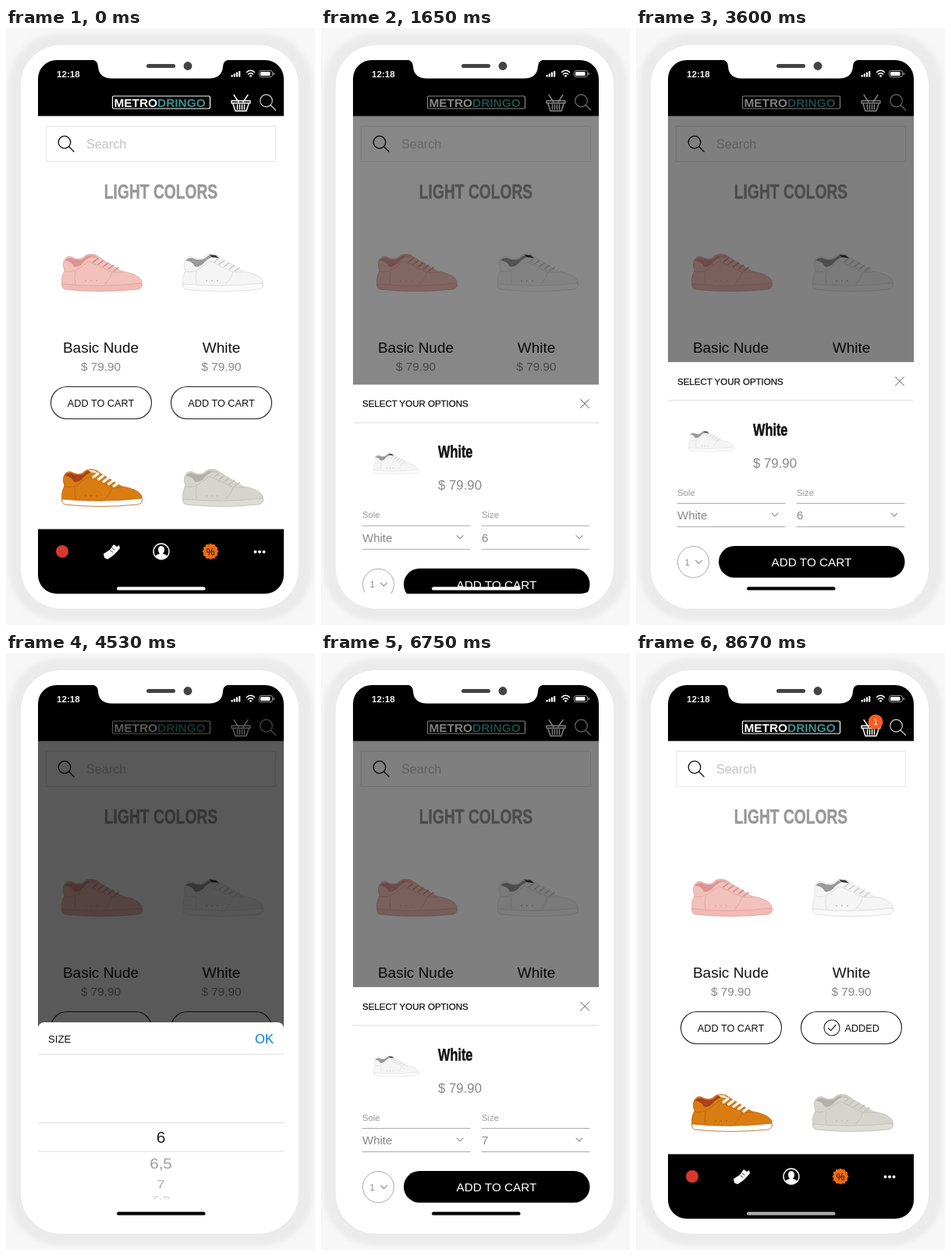
Recreate the animation shown at these times as an HTML page. Size 396 px wide and 763 px high, loop 8700 ms.

```html
<!DOCTYPE html>
<html lang="en">
<head>
<meta charset="utf-8">
<title>Shop demo</title>
<style>
html, body { margin: 0; width: 100%; height: 100%; overflow: hidden; background: #f7f7f7; }
svg { display: block; width: 100%; height: 100%; }
text { font-family: "Liberation Sans", Arial, sans-serif; }
.mid { text-anchor: middle; }
.bold { font-weight: bold; }
.line { fill: none; stroke-linecap: round; stroke-linejoin: round; }
</style>
</head>
<body>
<svg id="stage" viewBox="0 0 396 763"></svg>
<script>
const LOOP = 8700;
const CONDENSED = 0.76;
const SHEET_TOP = 427, PICKER_TOP = 481, SCREEN_BOTTOM = 723;
const WHEEL_R = 80, WHEEL_STEP = 0.425;
const SIZES = ['6', '6,5', '7', '7,5', '8', '8,5', '9', '9,5'];

const text = (x, y, size, fill, str, attrs = '') =>
  `<text x="${x}" y="${y}" font-size="${size}" fill="${fill}" ${attrs}>${str}</text>`;
const mid = (x, y, size, fill, str, attrs = '') => text(x, y, size, fill, str, `class="mid" ${attrs}`);
const line = (d, stroke, width = 1, attrs = '') =>
  `<path class="line" d="${d}" stroke="${stroke}" stroke-width="${width}" ${attrs}/>`;
const rect = (x, y, w, h, fill, attrs = '') =>
  `<rect x="${x}" y="${y}" width="${w}" height="${h}" fill="${fill}" ${attrs}/>`;
const circle = (x, y, r, fill, attrs = '') => `<circle cx="${x}" cy="${y}" r="${r}" fill="${fill}" ${attrs}/>`;
const condensed = (x, y, size, fill, str, cls) =>
  `<g transform="translate(${x} ${y}) scale(${CONDENSED} 1)">
    ${text(0, 0, size, fill, str, `class="bold ${cls}" stroke="${fill}" stroke-width=".5"`)}</g>`;
const lens = (x, y, r, stroke, width) => {
  const a = r * 0.71;
  return circle(x, y, r, 'none', `stroke="${stroke}" stroke-width="${width}"`) +
    line(`M${x + a} ${y + a}l6.5 6.5`, stroke, width);
};
const roundRect = (x, y, w, h, r) =>
  `M${x + r} ${y}h${w - 2 * r}a${r} ${r} 0 0 1 ${r} ${r}v${h - 2 * r}a${r} ${r} 0 0 1 ${-r} ${r}` +
  `h${2 * r - w}a${r} ${r} 0 0 1 ${-r} ${-r}v${2 * r - h}a${r} ${r} 0 0 1 ${r} ${-r}Z`;

const SHOES = {
  nude: { upper: '#f3c1bc', sole: '#f2bab4', edge: '#dba39e', inner: '#d99591', lace: '#c99490', tag: '#e0a7a2' },
  white: { upper: '#f5f5f5', sole: '#fafafa', edge: '#d8d8d8', inner: '#9a9a9a', lace: '#cfcfcf', tag: '#3a3a3a' },
  orange: { upper: '#d97d12', sole: '#ffffff', edge: '#b8600f', inner: '#a8401c', lace: '#ffffff', tag: '#f4e6d4' },
  grey: { upper: '#d6d4ce', sole: '#dedcd6', edge: '#bdbbb4', inner: '#b2b0a9', lace: '#c2c0b6', tag: '#c8c6bf' }
};

function shoe(x, y, tone, scale = 1) {
  const c = SHOES[tone];
  const laces = [0, 1, 2, 3, 4].map(i => `M${41 + i * 6.5} ${10 + i * 2.9}l6 -4.5`).join('');
  return `<g transform="translate(${x} ${y}) scale(${scale})">
    <path d="M3 9Q6 2 12 3Q20 8 27 5Q31 0 37 0L44 1Q54 8 63 13Q70 18 78 22Q98 25 103 34V41H1Q-1 30 4 21Q1 14 3 9Z" fill="${c.upper}" stroke="${c.edge}" stroke-width=".7"/>
    <path d="M4 8Q8 4 13 5Q21 9 28 6L33 2L40 3Q31 6 27 12Q22 17 16 16Q13 9 4 8Z" fill="${c.inner}"/>
    <path d="M34 .5L43 1.500L47 5L38 4Z" fill="${c.tag}"/>
    <path d="M1 38Q50 43 103 37Q105 43 98 45Q50 50 4 45Q0 43 1 38Z" fill="${c.sole}" stroke="${c.edge}" stroke-width=".8"/>
    ${line('M4 22Q14 25 24 17L35 9L65 23Q63 31 56 38M65 23L79 23M18 22Q16 30 18 38', c.edge, 0.8)}
    ${line(laces, c.lace, tone === 'orange' ? 3.2 : 1.7)}
    ${[31, 38, 45].map(d => circle(d, 34, 0.8, c.inner)).join('')}
  </g>`;
}

const button = (x, label) =>
  rect(x, 458.5, 129, 41, '#fff', 'rx="20.5" stroke="#222" stroke-width="1.1"') + label;

const basket = () =>
  line('M292 85.500l6 9M310 85.500l-6 9M289 93H313V96H289Z', '#fff', 1.4) +
  line('M291 97L294 106H308L311 97M296.5 98v6M299.5 98v6M302.5 98v6M305.5 98v6', '#fff', 1.5);

function scallop(x, y) {
  const points = Array.from({ length: 24 }, (_, i) => {
    const r = i % 2 ? 9 : 10.6, a = i * Math.PI / 12;
    return `${(x + r * Math.cos(a)).toFixed(1)},${(y + r * Math.sin(a)).toFixed(1)}`;
  });
  return `<polygon points="${points.join(' ')}" fill="#ed6b11"/>`;
}

const header = () => rect(41, 41, 315, 71.5, '#000') +
  rect(136.5, 87, 125, 16, '#000', 'rx="1.5" stroke="#fff" stroke-width="1.2"') +
  text(138.5, 100.5, 15.4, '#fff', 'METRO<tspan fill="#3d8f8c">DRINGO</tspan>', 'class="bold"') +
  basket() +
  `<g id="badge">${circle(0, 0, 9.5, '#f95c20')}${mid(0, 4, 11, '#fff', '1')}</g>` +
  lens(333.5, 93, 7.8, '#ccc', 1.2);

const nav = () => rect(41, 640.5, 315, 83, '#000') +
  circle(72, 669, 8, '#d8382f') +
  `<path d="M125 672L133 667L138 660L142 663L145 661L146 665L138 674L130 679L126 677Z" fill="#fff"/>` +
  line('M126 679L131 680L146 667M134 668l3 2M136 665l3 2', '#000', 0.8) +
  circle(199, 669, 10, '#000', 'stroke="#fff" stroke-width="1.4"') +
  `<path d="M191.5 675Q193 672.5 197 672Q194.5 669 195 665.5Q196 662 199 662Q202 662 203 665.5Q203.5 669 201 672Q205 672.5 206.5 675Q203.5 678.3 199 678.3Q194.5 678.3 191.5 675Z" fill="#fff"/>` +
  scallop(262, 669) + mid(262, 673.5, 12, '#111', '%') +
  [319.5, 325, 330.5].map(x => circle(x, 669.5, 1.9, '#fff')).join('');

const product = (cx, name) => mid(cx, 414.7, 19, '#111', name) + mid(cx, 438, 15.3, '#888', '$ 79.90');
const addLabel = x => mid(x, 483.5, 12.7, '#111', 'ADD TO CART');

const page = () => rect(41, 41, 315, 683, '#fff') +
  rect(51.5, 125.5, 294, 45, '#fff', 'stroke="#e6e6e6"') +
  lens(75, 146, 7.8, '#111', 1.3) + text(103, 154, 16.2, '#c3c3c3', 'Search') +
  condensed(198.5, 217.5, 25.3, '#999', 'LIGHT COLORS', 'mid') +
  shoe(71, 289, 'nude') + shoe(226, 289, 'white') +
  product(121.5, 'Basic Nude') + product(276, 'White') +
  button(57.5, addLabel(121.5)) +
  button(211.5, `<g id="toAdd">${addLabel(276)}</g><g id="added">` +
    circle(251, 479, 10, 'none', 'stroke="#222" stroke-width="1.1"') +
    line('M246.5 479.5L249.7 482.7L256 475.5', '#222', 1.2) +
    text(267.5, 483.5, 12.7, '#111', 'ADDED') + '</g>') +
  shoe(71, 564, 'orange') + shoe(226, 564, 'grey') +
  header() + nav();

const chevron = (x, y) => line(`M${x - 4} ${y - 2}l4 4l4-4`, '#999', 1.1);
const field = (x, w, label, value, id) => text(x, 597.5, 11.3, '#999', label) +
  line(`M${x} 607.5h${w}M${x} 637.5h${w}`, '#aaa', 1) +
  text(x, 628, 15, '#888', value, `id="${id}"`) + chevron(x + w - 13, 622);

const sheet = () => rect(41, SHEET_TOP, 315, 330, '#fff') +
  text(53, 455.5, 11.5, '#111', 'SELECT YOUR OPTIONS', 'stroke="#111" stroke-width=".25"') +
  line('M332.5 446l11 11m0-11l-11 11', '#555', 1) +
  rect(41, 475.5, 315, 1, '#ddd') +
  shoe(67, 515, 'white', 0.56) +
  condensed(150, 520.5, 21.5, '#111', 'White', '') +
  text(150, 561.5, 16.8, '#888', '$ 79.90') +
  field(53, 138, 'Sole', 'White', 'soleValue') + field(206, 138, 'Size', '6', 'sizeValue') +
  circle(73.5, 682.5, 20, '#fff', 'stroke="#aaa"') + text(62.5, 686.5, 11.5, '#888', '1') + chevron(80.5, 682.5) +
  rect(106, 662, 238.5, 40.5, '#000', 'rx="20.25"') + mid(225, 688, 15.3, '#fff', 'ADD TO CART');

const picker = () => rect(41, PICKER_TOP, 315, 300, '#fff', 'rx="8"') +
  text(54, 506.5, 13.2, '#111', 'SIZE') + text(319, 507.5, 16.6, '#0a7ce0', 'OK') +
  rect(41, 521.5, 315, 1, '#ddd') + rect(41, 609, 315, 1, '#ddd') + rect(41, 645.5, 315, 1, '#ddd') +
  SIZES.map(s => `<g class="size">${mid(0, 7.3, 21, 'currentColor', s)}</g>`).join('');

const status = () => text(65, 62.5, 11.6, '#f2f2f2', '12:18', 'class="bold"') +
  [0, 1, 2, 3].map(i => rect(288.5 + i * 3.2, 60 - i * 1.7, 2.2, 2.5 + i * 1.7, '#fff', 'rx=".6"')).join('') +
  line('M308.5 56.5Q313.5 52 318.5 56.5M310.5 59Q313.5 56.5 316.5 59', '#fff', 1.6) +
  circle(313.5, 61.3, 1.4, '#fff') +
  rect(324.5, 54.5, 17, 8, 'none', 'rx="2.4" stroke="#aaa" stroke-width=".9"') +
  rect(326, 56, 12.5, 5, '#fff', 'rx="1.2"') + rect(342.6, 57, 1.3, 3, '#aaa', 'rx=".6"');

// The white body lies over the screen and its hole rounds the corners.
const body = () =>
  `<path fill="#fff" fill-rule="evenodd" d="${roundRect(19, 22, 356, 720, 51)}${roundRect(41, 41, 315, 682, 24)}"/>
  <path d="M108 40Q118 41 118 49Q119 64.5 136 64.5H260Q277 64.5 278 49Q278 41 288 40Z" fill="#fff"/>` +
  rect(180, 46, 37, 5, '#444', 'rx="2.5"') + circle(233, 48.5, 5.4, '#444');

const stage = document.getElementById('stage');
stage.innerHTML = `<defs>
    <clipPath id="screen"><rect x="41" y="41" width="315" height="682"/></clipPath>
    <filter id="soft" x="-10%" y="-10%" width="120%" height="120%"><feGaussianBlur stdDeviation="3"/></filter>
  </defs>
  ${rect(0, 0, 396, 763, '#f7f7f7')}
  ${rect(4, 7, 388, 750, '#ebebeb', 'rx="64" filter="url(#soft)"')}
  <g clip-path="url(#screen)">
    ${page()}
    ${rect(41, 41, 315, 683, '#000', 'id="dim"')}
    <g id="sheet">${sheet()}</g>
    <g id="picker">${picker()}</g>
    ${status()}
    ${rect(142, 714.2, 113.5, 4.4, '#fff', 'rx="2.2" id="home"')}
  </g>
  ${body()}`;

const el = id => document.getElementById(id);
const parts = Object.fromEntries(
  ['dim', 'sheet', 'picker', 'home', 'badge', 'toAdd', 'added', 'sizeValue'].map(id => [id, el(id)]));
const wheel = [...document.querySelectorAll('.size')];

const ramp = (t, a, b) => Math.min(1, Math.max(0, (t - a) / (b - a)));
const easeOut = p => 1 - (1 - p) ** 3;
const easeIn = p => p * p;
const easeBoth = p => p * p * (3 - 2 * p);
const show = (node, on) => node.setAttribute('visibility', on ? 'visible' : 'hidden');
const shift = (node, y) => node.setAttribute('transform', `translate(0 ${y.toFixed(2)})`);

function drawWheel(pos) {
  wheel.forEach((node, i) => {
    const a = (i - pos) * WHEEL_STEP, flat = Math.cos(a), off = Math.abs(i - pos);
    show(node, flat > 0.1);
    if (flat <= 0.1) return;
    const y = 628 + WHEEL_R * Math.sin(a), sx = 1 - 0.22 * (1 - flat);
    node.setAttribute('transform', `translate(198.5 ${y.toFixed(2)}) scale(${sx.toFixed(3)} ${flat.toFixed(3)})`);
    const g = Math.round(off < 1 ? 34 + 126 * off : Math.min(205, 160 + 18 * (off - 1)));
    node.style.color = `rgb(${g},${g},${g})`;
  });
}

function draw(t) {
  const sheetUp = easeOut(ramp(t, 1350, 1907)) - easeIn(ramp(t, 3640, 3860)) +
    easeOut(ramp(t, 6130, 6470)) - easeBoth(ramp(t, 7210, 7650));
  const pickerUp = easeOut(ramp(t, 3740, 4130)) - easeIn(ramp(t, 6010, 6250));
  const lift = 9 * (1 - easeBoth(ramp(t, 4540, 4760)));
  const dim = 0.5 * ramp(t, 1350, 1670) + 0.15 * ramp(t, 3700, 4100) -
    0.15 * ramp(t, 6010, 6400) - 0.5 * ramp(t, 7210, 7650);

  shift(parts.sheet, (1 - sheetUp) * (SCREEN_BOTTOM - SHEET_TOP));
  shift(parts.picker, (1 - pickerUp) * (SCREEN_BOTTOM - PICKER_TOP) - lift * pickerUp);
  show(parts.sheet, sheetUp > 0.001);
  parts.picker.style.display = pickerUp > 0.001 ? '' : 'none';
  parts.dim.setAttribute('opacity', Math.max(0, dim).toFixed(3));
  drawWheel(2 * easeBoth(ramp(t, 4760, 5580)));
  parts.sizeValue.textContent = t < 6000 ? '6' : '7';

  const glow = Math.round(255 * (1 - ramp(t, 2600, 3017) + ramp(t, 8400, 8800)));
  parts.home.setAttribute('fill', `rgb(${glow},${glow},${glow})`);

  const inCart = t >= 7700;
  show(parts.toAdd, !inCart);
  show(parts.added, inCart);
  show(parts.badge, inCart);
  parts.badge.setAttribute('transform', `translate(307 88) scale(${easeOut(ramp(t, 7680, 7850)).toFixed(3)})`);
}

const start = performance.now();
function tick() {
  draw((performance.now() - start) % LOOP);
  requestAnimationFrame(tick);
}
tick();
</script>
</body>
</html>
```
